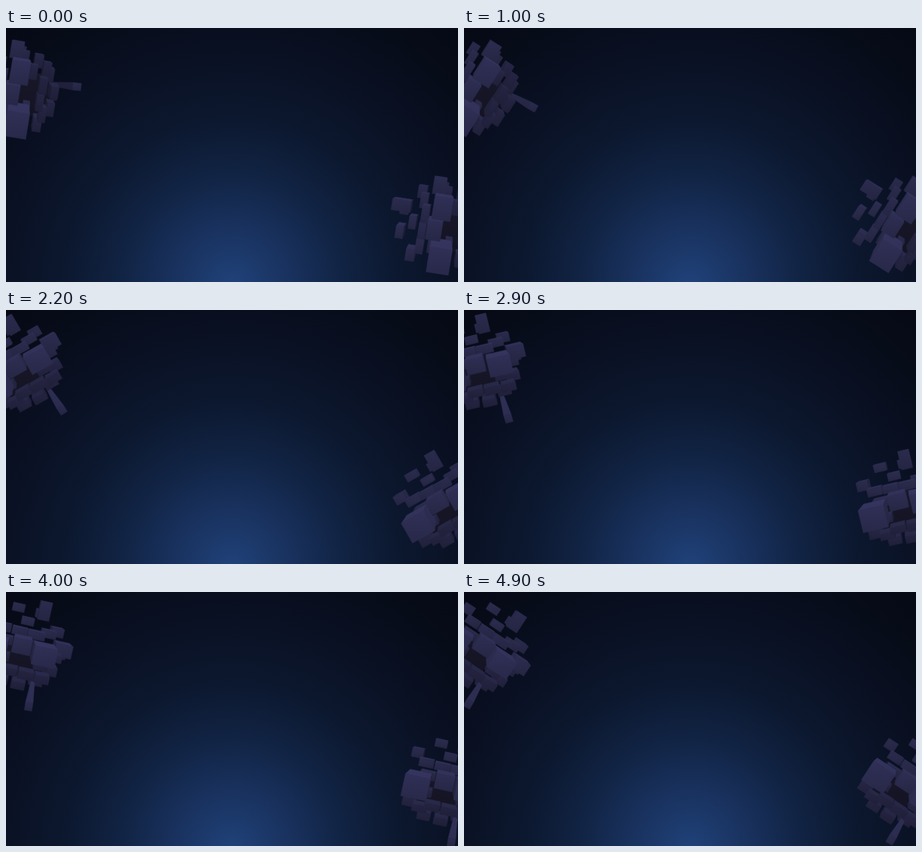
Animation of 600 by 338 pixels, one loop 5 s. Source, as an HTML page with a canvas:

```html
<!DOCTYPE html>
<html lang="en">
<head>
<meta charset="utf-8">
<title>Drifting blocks</title>
<style>
  html, body { margin: 0; width: 100%; height: 100%; overflow: hidden; }
  body {
    background: radial-gradient(circle at 300px 342px,
      #20427a 0, #19325f 75px, #112343 150px, #0c182f 220px,
      #0a1124 300px, #070c19 390px, #060914 460px);
  }
  canvas { display: block; width: 600px; height: 338px; }
</style>
</head>
<body>
<canvas id="stage" width="600" height="338"></canvas>
<script>
const ctx = document.getElementById('stage').getContext('2d');
const RAD = Math.PI / 180;
const LOOP = 5000, STEP = 100;
const SPEED = 23.3 * RAD;   // per second
const UPRIGHT = 3.6;        // seconds at which the cluster stands upright
const LEAN = 3 * RAD;       // extra turn of each block about itself
const TILT = 0.14, LIFT = 0.34, DIST = 220;
const COPIES = [[22, 80], [583, 261]];

let seed = 7;
function vary(size, amount) {
  seed = seed * 16807 % 2147483647;
  return size * (1 + amount * (seed / 1073741823.5 - 1));
}

const block = (x, y, w, h, z, d, tone) => ({ x, y, w, h, z, d, tone });

// Small bricks spread evenly on a ring that may sit off centre
function ring({ count, from, step, radius, shift, w, h, z, d }) {
  return Array.from({ length: count }, (_, i) => {
    const a = (from + i * step) * RAD;
    const r = radius + shift * Math.cos(a + 115 * RAD);
    const x = r * Math.cos(a), y = r * Math.sin(a);
    return block(x, y, vary(w, 0.1), vary(h, 0.12), z, d, 0.88 - 0.08 * Math.sin(a));
  });
}

const blocks = [
  block(-10, 6, 54, 50, -30, 12, 0.5),
  ...ring({ count: 10, from: -136, step: 32, radius: 50, shift: 10, w: 17, h: 11, z: 0, d: 13 }),
  ...ring({ count: 8, from: -135, step: 45, radius: 42, shift: 0, w: 18, h: 9.5, z: 6, d: 12 }),
  ...ring({ count: 8, from: -107, step: 45, radius: 29, shift: 0, w: 21, h: 10, z: 13, d: 13 }),
  // large blocks
  block(20, -59, 15, 25, 2, 12, 0.95),
  block(51, -12, 23, 17, 3, 16, 0.97),
  block(-3, -10, 25, 20, 28, 22, 1),
  block(27, -2, 31, 25, 30, 26, 1.05),
  block(-38, 1, 34, 30, 32, 28, 1.05)
];

// Long block reaching outward and toward the viewer
const beam = { x: 14, near: 66, far: 32, w: 10, h: 11, scale: 0.45 };

const paint = tone => `rgb(${46 * tone | 0},${46 * tone | 0},${83 * tone | 0})`;

function spin(x, y, a) {
  const c = Math.cos(a), s = Math.sin(a);
  return [x * c - y * s, x * s + y * c];
}

function rect([x, y], w, h, a) {
  return [[-1, -1], [1, -1], [1, 1], [-1, 1]].map(([i, j]) => {
    const p = spin(i * w / 2, j * h / 2, a);
    return [x + p[0], y + p[1]];
  });
}

function face(pts, tone, fade) {
  const ys = pts.map(p => p[1]);
  const g = ctx.createLinearGradient(0, Math.min(...ys), 0, Math.max(...ys));
  g.addColorStop(0, paint(tone));
  g.addColorStop(1, paint(tone * fade));
  ctx.beginPath();
  pts.forEach(p => ctx.lineTo(p[0], p[1]));
  ctx.closePath();
  ctx.fillStyle = ctx.strokeStyle = g;
  ctx.fill();
  ctx.stroke();
}

function prism({ front, back, tone }, a) {
  for (let i = 0; i < 4; i++) {
    const j = (i + 1) % 4, p = front[i], q = front[j], r = back[j];
    const turn = (q[0] - p[0]) * (r[1] - q[1]) - (q[1] - p[1]) * (r[0] - q[0]);
    if (turn >= 0) continue;
    const up = -Math.sin(a + (i - 1) * 90 * RAD);
    face([p, q, r, back[i]], tone * (0.72 + 0.4 * up), 0.95);
  }
  face(front, tone, 0.84);
}

function blockShape({ x, y, w, h, z, d, tone }, a) {
  const base = TILT * z, k = d / DIST, drop = LIFT * d / 2;
  const [u, v] = spin(x, y - base, a);
  const end = (scale, dy) => [u * scale, base + v * scale + dy];
  return {
    front: rect(end(1 + k / 2, drop), w, h, a + LEAN),
    back: rect(end(1 - k / 2, -drop), w * (1 - k), h * (1 - k), a + LEAN),
    depth: z - 0.3 * v, tone
  };
}

function beamShape(a) {
  const at = y => {
    const [u, v] = spin(beam.x, y, a);
    return [5 + u, 5 + v];
  };
  const { near, far, w, h, scale } = beam;
  return {
    front: rect(at(near), w, h, a),
    back: rect(at(far), w * scale, h * scale, a),
    depth: -10, tone: 0.95
  };
}

function draw(ms) {
  const a = SPEED * (ms / 1000 - UPRIGHT);
  const shapes = [...blocks.map(b => blockShape(b, a)), beamShape(a)];
  shapes.sort((p, q) => p.depth - q.depth);
  ctx.clearRect(0, 0, 600, 338);
  ctx.lineWidth = 0.5;
  ctx.lineJoin = 'round';
  for (const [x, y] of COPIES) {
    ctx.save();
    ctx.translate(x, y);
    shapes.forEach(s => prism(s, a));
    ctx.restore();
  }
}

const start = performance.now();
function tick() {
  const t = (performance.now() - start) % LOOP;
  draw(Math.floor(t / STEP) * STEP);
  requestAnimationFrame(tick);
}
tick();
</script>
</body>
</html>
```
